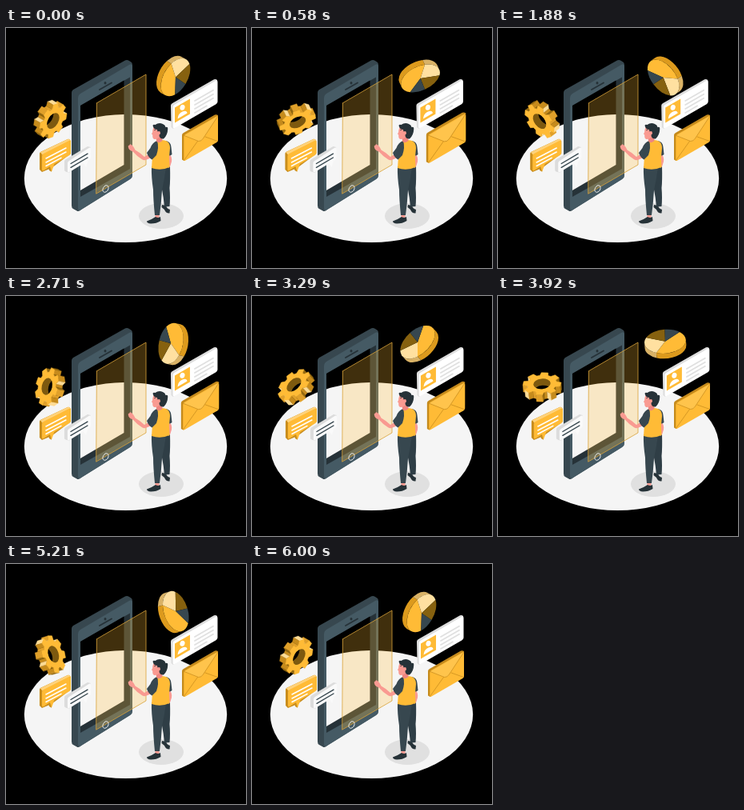
An HTML page with a canvas for the animation above (6040 ms loop, 300 px wide and 300 px high).

```html
<!DOCTYPE html>
<html lang="en">
<head>
<meta charset="utf-8">
<title>Mobile interface</title>
<style>
html, body { margin: 0; width: 100%; height: 100%; overflow: hidden; background: #000; }
canvas { display: block; width: 300px; height: 300px; }
</style>
</head>
<body>
<canvas id="stage"></canvas>
<script>
const LOOP = 6040, FPS = 24, STEPS = 144, TAU = Math.PI * 2;
const GOLD = '#ffbb36', DARK = '#37474f', INK = '#263238', SKIN = '#f99a91';
const canvas = document.getElementById('stage');
const ctx = canvas.getContext('2d');
const dpr = window.devicePixelRatio || 1;
canvas.width = canvas.height = 300 * dpr;
ctx.lineJoin = ctx.lineCap = 'round';

// Polygon from a flat list of coordinates
function poly(pts, fill, stroke, width = 0.6) {
  ctx.beginPath();
  for (let i = 0; i < pts.length; i += 2) ctx.lineTo(pts[i], pts[i + 1]);
  ctx.closePath();
  paint(fill, stroke, width);
}

function paint(fill, stroke, width = 0.6) {
  if (fill) { ctx.fillStyle = fill; ctx.fill(); }
  if (stroke) { ctx.strokeStyle = stroke; ctx.lineWidth = width; ctx.stroke(); }
}

function shape(d, fill, stroke, width) {
  const p = new Path2D(d);
  if (fill) { ctx.fillStyle = fill; ctx.fill(p); }
  if (stroke) { ctx.strokeStyle = stroke; ctx.lineWidth = width; ctx.stroke(p); }
}

function oval(x, y, rx, ry, fill, stroke, width, turn = 0) {
  ctx.beginPath();
  ctx.ellipse(x, y, rx, ry, turn, 0, TAU);
  paint(fill, stroke, width);
}

function line(x1, y1, x2, y2, color, width) {
  ctx.beginPath();
  ctx.moveTo(x1, y1);
  ctx.lineTo(x2, y2);
  paint(null, color, width);
}

function place(x, y, turn, scale, draw) {
  ctx.save();
  ctx.translate(x, y);
  ctx.rotate(turn);
  ctx.scale(scale, scale);
  draw();
  ctx.restore();
}

// Linear interpolation over [position, value] stops
function track(stops, p) {
  for (let i = 1; i < stops.length; i++) {
    const [a, u] = stops[i - 1], [b, v] = stops[i];
    if (p <= b) return u + (v - u) * (p - a) / (b - a);
  }
  return stops[stops.length - 1][1];
}

const SHAKE = [[0, 0], [.1, -.6], [.2, 1.2], [.3, -2.4], [.4, 2.4], [.5, -2.4],
  [.6, 2.4], [.7, -2.4], [.8, 1.2], [.9, -.6], [1, 0]];
const BEAT = [[0, 1], [.1, 1.1], [.3, 1], [.4, 1], [.5, 1.1], [.6, 1], [1, 1]];

function phone() {
  // Body: back-left side, top edge, front
  shape('M82 81 Q82 78 85 76.5 L148 41 Q151 39 154 41 L157 43 Q158 44 158 47 L158 184 Q158 187 155 189 L94 227 Q91 230 88.5 228.5 L84 226 Q82 225 82 222 Z', DARK);
  shape('M90 88 Q90 84 93 82 L154 46 Q158 44 158 48 L158 184 Q158 187 155 189 L94 227 Q90 229.5 90 225 Z', '#455a64');
  // Screen opening with its inner walls
  poly([93, 97, 155, 61.5, 155, 176, 93, 211], INK);
  ctx.save();
  poly([93, 97, 147.5, 65.5, 147.5, 171, 93, 203]);
  ctx.clip();
  ctx.fillStyle = '#000';
  ctx.fillRect(80, 40, 90, 190);
  floor();
  ctx.restore();
  oval(124, 68.7, 1.5, 1.8, INK);
  line(117, 77, 132, 68.5, INK, 1.8);
}

function floor() {
  oval(149.5, 188, 126.7, 80, '#f5f5f5');
}

function panel() {
  poly([113, 94, 175, 58, 175, 171, 113, 207], 'rgba(255,187,54,.25)', '#d9a23a', 0.8);
  oval(124.6, 201, 3.2, 4.6, null, '#f5f5f5', 0.9, 0.5);
}

function man() {
  oval(194, 235, 28, 16, '#e0e0e0');
  // Shoes and ankles
  shape('M195 221 L200 222 Q201 226 205 227 L204.5 231.5 Q200 232 198 227 L194.5 224 Z', INK);
  shape('M186.5 231 H191.5 V237 H186.5 Z', SKIN);
  shape('M187 236 Q190 238 193 236 L193.5 241 Q188 244.5 181 244.5 Q176 244 176 241.5 Q182 239.5 187 236 Z', INK);
  // Trousers
  shape('M189 173 L205 173 Q205.5 190 204.5 200 Q205.5 213 204.5 223 L198 223.5 Q197 212 195 202 Z', '#2f3e46');
  shape('M182 173 L200 174 Q198 190 195 203 Q194 220 192 234 L186 234 Q184 214 184 202 Q181.5 186 182 173 Z', DARK);
  // Far arm
  shape('M203 156 Q208 160 207 167 Q206 172 203.5 175 L202 172 Z', SKIN);
  shape('M200 141 Q206 142 206.5 149 L207.5 158 Q205.5 160 202.5 159.5 Z', DARK);
  // Reaching arm
  shape('M183 155 L173 161 Q168 156 161.5 152.5 Q159 147 156 145.5 Q154.5 145 154.5 146.2 L152.8 147.2 Q152.5 151 155.5 153 L159 154.8 Q164 161 170.5 164.5 Q173.5 166 177 164 L186 160 Z', SKIN);
  // Torso
  shape('M187 142 Q193 138.5 200 141 Q205 143 205 150 Q203 162 204.5 174 Q193 179 182 175 Q183 160 184 151 Z', GOLD);
  shape('M189 141 Q183 143 180.5 150 L176 156 Q178 162 182.5 164.5 L188 159 Q191.5 149 189 141 Z', DARK);
  // Neck, head, hair
  shape('M187.5 134 L195 134 L195.5 141 Q191 145 188 141.5 Z', '#ee857f');
  shape('M184.5 124 Q183 128 183.2 130 L182 132.5 L183.2 133.5 Q183 138.5 185.5 139 Q190.5 139.2 194 134 L195 124 Z', SKIN);
  shape('M183.5 122 Q184 120 186.5 121 Q191 117.8 196 120 Q199 121 199.5 124 Q202.5 123 202.3 126 Q202 134 197 138.5 Q193.5 139 191.8 136 L191 130 Q189 130 189 126.8 Q185 127.5 183.5 122 Z', INK);
  oval(191.2, 131.3, 1.7, 2.3, SKIN);
  line(185.5, 127.7, 186.7, 127.4, INK, 0.7);
}

function goldBubble() {
  shape('M42 157 Q42 155.5 43.5 154.7 L77 139 Q79 138 81 141 L81 157 L57 175 L45 180 L42 177 Z', '#c98d1c');
  shape('M53 173 L57.2 171 L57 179.8 L54 178 Z', '#c98d1c');
  shape('M42.8 155.3 L77.5 138.8 Q79.5 138.3 81 140.5 L46 159 Z', '#ffd27a');
  shape('M45 160 Q45 158 47 157 L78.5 141 Q81 139.8 81 142.5 L81 156 Q81 158 79 159.3 L60.5 170 L57 179.5 L55 173 L47.5 177.7 Q45 179.5 45 176.5 Z', GOLD);
  line(50, 163, 75, 150, '#fff', 1.5);
  line(50, 168, 75, 155, '#fff', 1.5);
  line(50, 172.5, 69, 162.3, '#fff', 1.5);
}

function whiteBubble() {
  shape('M73 167 Q73 165 75 164 L102 148 L106 149 L79 181 L74.5 179.5 Q73 179 73 177 Z', '#dcdcdc');
  shape('M77 169 Q77 167 79 166 L103.5 150 Q106 148.5 106 151.5 L106 162 Q106 164 104 165.2 L102.5 166 L100 174 L97 169.3 L79.5 180 Q77 181.5 77 178.5 Z', '#fafafa');
  line(81, 169.5, 102, 157.2, DARK, 1.4);
  line(81, 174.3, 102, 162, DARK, 1.4);
}

function card() {
  shape('M206 97 Q206 95 208 94 L260 64.3 Q262 63.2 264 65 L264 92 L209 126 L206.5 124 Z', '#dedede');
  shape('M208.7 99 Q208.7 97 210.5 96 L262 66 Q264.5 64.7 264.5 67.5 L264.5 92 Q264.5 94 262.5 95.2 L211 125 Q208.7 126.3 208.7 123.5 Z', '#fff');
  poly([211, 99.5, 230, 88.5, 230, 107.5, 211, 118.5], GOLD);
  oval(220.5, 99.3, 3, 3.5, '#fff', null, 0, 0.3);
  shape('M214.5 113.5 Q215 106.8 220.5 104.5 Q226 102.3 226.5 106.5 Z', '#fff');
  for (let i = 0; i < 4; i++) {
    const end = i < 3 ? 259 : 251, y = 91 + i * 5;
    line(236, y, end, y - (end - 236) * 0.577, '#e0e0e0', 1.8);
  }
}

function envelope() {
  shape('M220 134 Q220 132 222 131 L261 108.6 Q263 107.6 265 109 L265 140 L222.5 166 L220 164.5 Z', '#c58a1c');
  shape('M222.3 136 Q222.3 134 224 133 L263 110.4 Q265 109.3 265 111.8 L265 140 Q265 142 263.3 143 L224 165.7 Q222.3 166.6 222.3 164.3 Z', GOLD);
  line(222.8, 165, 239.5, 141.5, '#c58a1c', 0.7);
  line(249, 136, 264.6, 141.5, '#c58a1c', 0.7);
  shape('M222.8 134.5 L240.5 141.5 Q244 142 246.5 138 L264.6 110.5', '#ffc44c', '#c58a1c', 0.7);
}

// Both spinning solids lie in a plane whose long axis is horizontal here
function pie() {
  const rx = 26, ry = 15, t = 6.4, rad = Math.PI / 180;
  const sector = (from, to, fill) => {
    ctx.beginPath();
    ctx.moveTo(0, -t / 2);
    ctx.ellipse(0, -t / 2, rx, ry, 0, from * rad, to * rad);
    ctx.closePath();
    paint(fill);
  };
  const wall = (from, to, fill) => {
    ctx.beginPath();
    ctx.ellipse(0, -t / 2, rx, ry, 0, from * rad, to * rad);
    ctx.ellipse(0, t / 2, rx, ry, 0, to * rad, from * rad, true);
    ctx.closePath();
    paint(fill);
  };
  wall(0, 118, '#dc9a1d');
  wall(118, 180, '#d9b266');
  sector(-43, 118, GOLD);
  sector(118, 207, '#ffe0a0');
  sector(207, 272, '#86610f');
  sector(272, 317, DARK);
}

function gear() {
  const rx = 24, ry = 14, t = 8.5, teeth = 8, pts = [];
  for (let i = 0; i < teeth; i++) {
    for (const [off, r] of [[-.36, .77], [-.22, 1], [.22, 1], [.36, .77]]) {
      const a = (i + off + 0.25) / teeth * TAU;
      pts.push([rx * r * Math.cos(a), ry * r * Math.sin(a) - t / 2]);
    }
  }
  const walls = [];
  pts.forEach(([x1, y1], i) => {
    const [x2, y2] = pts[(i + 1) % pts.length];
    if (x2 < x1) walls.push({ x1, y1, x2, y2 });
  });
  walls.sort((a, b) => a.y1 + a.y2 - b.y1 - b.y2);
  for (const { x1, y1, x2, y2 } of walls) {
    const n = Math.atan2((x1 - x2) / ry, (y2 - y1) / rx * 1.7);
    const tone = n > 2 ? '#ffdc94' : n > 1.65 ? '#e0a02a' : n > 1.1 ? '#c68b1c' : '#94690f';
    poly([x1, y1, x2, y2, x2, y2 + t, x1, y1 + t], tone, tone, 0.3);
  }
  poly(pts.flat(), GOLD, GOLD, 0.5);
  ctx.save();
  oval(0, -t / 2, 10.8, 6.4, '#7d590f');
  ctx.clip();
  oval(0, t / 2, 10.8, 6.4, '#000');
  ctx.restore();
}

function render(p) {
  ctx.setTransform(dpr, 0, 0, dpr, 0, 0);
  ctx.fillStyle = '#000';
  ctx.fillRect(0, 0, 300, 300);
  const turn = p * TAU + TAU / 3, dx = track(SHAKE, p);
  floor();
  phone();
  panel();
  man();
  place(55.3, 114, turn, 1, gear);
  place(209.2, 60, turn, 1, pie);
  place(dx, 0, 0, 1, () => { goldBubble(); whiteBubble(); card(); });
  place(242.5, 137, 0, track(BEAT, p), () => {
    ctx.translate(-242.5, -137);
    envelope();
  });
}

const start = performance.now();
function tick() {
  const t = (performance.now() - start) % LOOP;
  const step = Math.min(STEPS, Math.floor((t + 5) * FPS / 1000));
  render(step / STEPS);
  requestAnimationFrame(tick);
}
tick();
</script>
</body>
</html>
```
